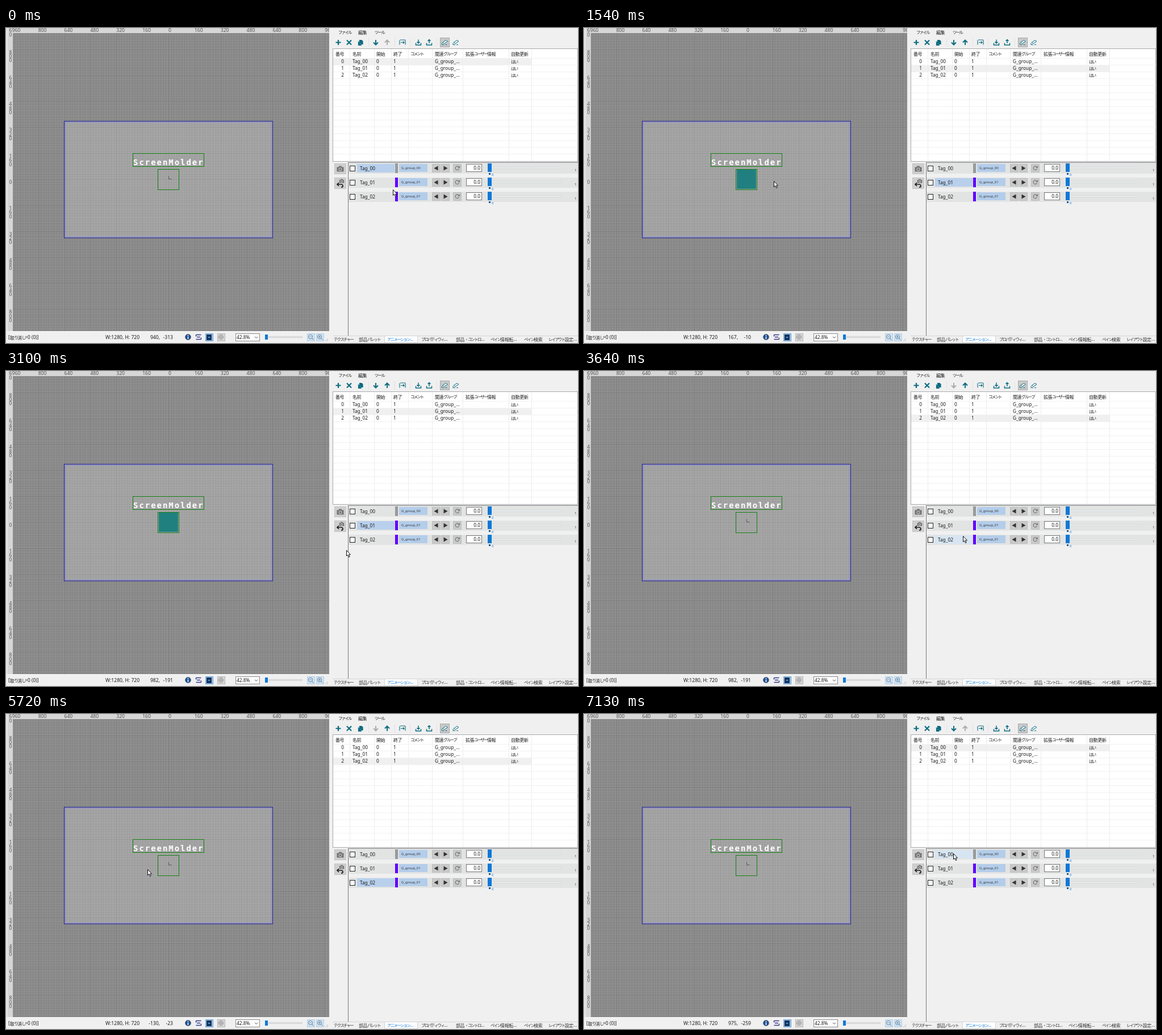
An HTML page with a canvas that plays this animation: 1007x556 px, repeating every 8 s.

```html
<!DOCTYPE html>
<html lang="ja">
<head>
<meta charset="utf-8">
<title>Layout tool</title>
<style>
html, body { margin: 0; width: 100%; height: 100%; overflow: hidden; background: #f0f0f0; }
canvas { display: block; }
</style>
</head>
<body>
<canvas id="stage" width="1007" height="556"></canvas>
<script>
const c = document.getElementById('stage').getContext('2d');
const LOOP = 8000, SCALE = 0.2867, CX = 286, CY = 267;
const TEAL = '#0b6b80', BLUE = '#0f78d7', INK = '#1c1c1c';

// Cursor moves: start, end, number of steps, points on the way
const moves = [
  [80, 310, 4, [[681, 285], [674, 277], [666, 272]]],
  [860, 1540, 10, [[666, 272], [560, 300], [420, 305], [334, 270]]],
  [1620, 2390, 11, [[334, 270], [300, 234], [240, 240], [232, 264], [233.8, 286.2]]],
  [2710, 3250, 8, [[233.8, 286.2], [400, 315], [567, 322], [667, 291]]],
  [3870, 4640, 11, [[667, 291], [500, 276], [340, 275], [240.4, 294.2]]],
  [4710, 5480, 11, [[240.4, 294.2], [300, 320], [341, 270], [290, 228], [240, 255], [252, 285]]],
  [5580, 5720, 3, [[252, 285], [248.7, 273.6]]],
  [6140, 6900, 11, [[248.7, 273.6], [400, 335], [565, 341], [650, 246]]]
];

function along(points, u) {
  const n = points.length - 1, k = Math.min(n - 1, Math.floor(u * n)), f = u * n - k;
  const [a, b, d, e] = [-1, 0, 1, 2].map(i => points[Math.max(0, Math.min(n, k + i))]);
  return [0, 1].map(i => b[i] + f / 2 * (d[i] - a[i] +
    f * (2 * a[i] - 5 * b[i] + 4 * d[i] - e[i] + f * (3 * (b[i] - d[i]) + e[i] - a[i]))));
}

function cursorAt(t) {
  const [from, to, steps, points] = moves.filter(m => t >= m[0]).pop() || moves[0];
  if (t < from) return points[0];
  const done = Math.floor((t - from) / (to - from) * (steps - 1) + 1e-6) + 1;
  return along(points, Math.min(1, done / steps));
}

function box(x, y, w, h, fill, edge) {
  if (fill) { c.fillStyle = fill; c.fillRect(x, y, w, h); }
  if (edge) { c.strokeStyle = edge; c.lineWidth = 1; c.strokeRect(x + .5, y + .5, w - 1, h - 1); }
}

function draw(x, y, path, stroke, fill, width = 1) {
  const p = new Path2D(path);
  c.save();
  c.translate(x, y);
  if (fill) { c.fillStyle = fill; c.fill(p); }
  if (stroke) { c.strokeStyle = stroke; c.lineWidth = width; c.stroke(p); }
  c.restore();
}

// Kana are set smaller and tighter than kanji, as in a compact UI face
function text(s, x, y, color = INK, size = 8.3, align = 'left') {
  c.fillStyle = color;
  c.textBaseline = 'middle';
  c.textAlign = align;
  for (const run of s.match(/[\u3040-\u30ff]+|[\u4e00-\u9fff]+|[^\u3040-\u9fff]+/g)) {
    const kana = /[\u3040-\u30ff]/.test(run), kanji = /[\u4e00-\u9fff]/.test(run);
    c.font = kana ? '7.3px "Noto Sans CJK JP", "Noto Sans CJK", sans-serif'
      : kanji ? '8px "Noto Sans CJK JP", "Noto Sans CJK", sans-serif'
      : size + 'px "Noto Sans", "Open Sans", sans-serif';
    c.letterSpacing = kana ? '-1.6px' : kanji ? '-0.4px' : '0px';
    c.fillText(run, x, y + .5);
    x += c.measureText(run).width;
  }
  c.letterSpacing = '0px';
}

function grid(step, color) {
  for (let x = CX - Math.floor(274 / step) * step; x < 569; x += step) box(Math.round(x), 9, 1, 526, color);
  for (let y = CY - Math.floor(258 / step) * step; y < 535; y += step) box(12, Math.round(y), 557, 1, color);
}

function canvasArea(logo) {
  box(0, 0, 570, 536, '#e4e4e4');
  box(3, 0, 567, 535, '#d6d6d6');
  box(12, 9, 558, 526, '#8e8e8e');
  grid(16 * SCALE, 'rgba(0,0,0,.05)');
  grid(160 * SCALE, 'rgba(0,0,0,.05)');
  box(102, 164, 368, 207, 'rgba(255,255,255,.2)', '#1c1c9c');
  box(104, 166, 364, 203, null, '#8585cf');

  c.save();
  c.beginPath();
  c.rect(3, 0, 566, 535);
  c.clip();
  for (let i = -6; i <= 6; i++) {
    const label = String(Math.abs(i * 160)), d = i * 160 * SCALE;
    text(label, CX + d, 4, '#555', 8.6);
    [...label].forEach((ch, k) => text(ch, 8, CY + d + 5 + k * 7.4, '#555', 8.6, 'center'));
  }
  c.restore();
  box(0, 535, 570, 1, '#f8f8f8');

  if (logo) box(269, 250, 34, 34, '#208080');
  else draw(286.5, 261.5, 'M0 0V5H5', '#555');
  box(223, 221, 126, 24, null, '#118011');
  box(267, 249, 38, 37, null, '#118011');
  c.font = 'bold 14px "DejaVu Sans Mono", monospace';
  c.letterSpacing = '1.95px';
  c.textAlign = 'left';
  c.textBaseline = 'alphabetic';
  c.fillStyle = '#fff';
  c.fillText('ScreenMolder', 224, 242);
  c.letterSpacing = '0px';
}

function statusBar(x, y) {
  box(0, 536, 570, 20, '#f0f0f0');
  text('[取り消し=0 (0)]', 4, 546);
  text('W:1280, H: 720', 175, 546, INK, 8.6);
  text(x + ',', 271, 546, INK, 8.6, 'right');
  text(String(y), 294, 546, INK, 8.6, 'right');
  draw(320.5, 545.5, 'M5 0A5 5 0 1 1 -5 0A5 5 0 1 1 5 0', '#777', '#1b4f94');
  draw(320.5, 545.5, 'M0 -3.4V-1.8M0 -.8V3.4', '#fff', null, 1.6);
  draw(339, 545.5, 'M-4.5 -4H4.5M-4.5 4H4.5M-3 0H3M-4.5 -4V-1M4.5 1V4', '#34348a', null, 1.4);
  box(351, 539, 14, 14, '#9fc6ea', '#6aa0d0');
  box(353, 541, 9, 10, '#12335e');
  draw(357.5, 546, 'M-2.5 0Q0 -2 2.5 0Q0 2 -2.5 0', null, '#6aa0d0');
  box(372, 539, 14, 14, '#d8d8d8', '#b4b4b4');
  draw(378.5, 545.5, 'M4 0A4 4 0 1 1 -4 0A4 4 0 1 1 4 0M-4 0H4M0 -4V4', '#909090');
  box(404, 539, 43, 14, '#fff', '#8a8a8a');
  text('42.8%', 406, 546);
  draw(440.5, 546, 'M-2.5 -1.2L0 1.2L2.5 -1.2', '#444');
  box(462, 544, 60, 3, '#e2e4e4', '#d2d4d4');
  box(456, 541, 5, 9, BLUE);
  [537, 553].forEach((mx, i) => {
    box(mx - 7, 539, 14, 14, '#cfe2f2', '#b8cfe2');
    draw(mx - 1, 545, 'M3.5 0A3.5 3.5 0 1 1 -3.5 0A3.5 3.5 0 1 1 3.5 0M2.5 2.5L5.5 5.5M-2 0H2' +
      (i ? 'M0 -2V2' : ''), '#4a7496', '#f4faff');
  });
  draw(562, 553, 'M0 0L5 -5M3 0L5 -2', '#bbb');
}

function toolbar(sel) {
  box(569, 0, 438, 556, '#f0f0f0');
  text('ファイル', 585, 7);
  text('編集', 620, 7);
  text('ツール', 649, 7);
  draw(585, 25.5, 'M-4.5 0H4.5M0 -4.5V4.5', TEAL, null, 2.2);
  draw(604, 25.5, 'M-4 -4L4 4M4 -4L-4 4', TEAL, null, 2.2);
  draw(624, 25.5, 'M-1.5 -4H2L4 -2V3H-1.5ZM-3.5 -2V5H2', TEAL, TEAL, 1.2);
  const off = '#ababab';
  draw(651, 25.5, 'M0 -4.5V4M-4 0L0 4L4 0', sel == 2 ? off : TEAL, null, 2);
  draw(671, 25.5, 'M0 4.5V-4M-4 0L0 -4L4 0', sel == 0 ? off : TEAL, null, 2);
  draw(698, 25.5, 'M-5 -4V4M5 -4V4M-3 0H3M1 -2L3 0L1 2M-4 -4.5H5', TEAL, null, 1.1);
  const tray = 'M-4.5 1V4.5H4.5V1M0 -5V1.5';
  draw(726, 25.5, tray + 'M-2.5 -1L0 1.5L2.5 -1', TEAL, null, 1.5);
  draw(745, 25.5, tray + 'M-2.5 -2.5L0 -5L2.5 -2.5', TEAL, null, 1.5);
  box(764, 17, 17, 17, '#c9c9c9', '#a8a8a8');
  const pen = 'M-4 0L2 -4L5 -2L-1 2ZM-5 1V4H-1M1 4H4';
  draw(772.5, 25.5, pen, TEAL, '#eef6f8');
  draw(792, 25.5, pen, TEAL, '#eef6f8');
  draw(638.5, 18, 'M0 0V15M46 0V15M73 0V15M120 0V15', '#e2e2e2');
}

function table(sel) {
  box(575, 36, 432, 200, '#fff', '#a8abb0');
  box(576, 53 + Math.round(sel * 12.1), 349, 12, '#f0f0f0');
  for (const x of [605, 648, 678, 708, 750, 804, 885, 925]) box(x, 37, 1, 198, '#ececec');
  for (let i = 0; i < 15; i++) box(576, Math.round(53 + i * 12.1), 431, 1, '#f1f1f1');
  const cols = [580, 610, 652, 682, 712, 755, 809, 889];
  ['番号', '名前', '開始', '終了', 'コメント', '関連グループ', '拡張ユーザー情報', '自動更新']
    .forEach((s, i) => text(s, cols[i], 45));
  for (let i = 0; i < 3; i++) {
    const y = 59 + i * 12.1;
    text(String(i), 595, y, INK, 8.3, 'right');
    text('Tag_0' + i, 610, y);
    text('0', 652, y);
    text('1', 682, y);
    text('G_group_...', 755, y);
    text('はい', 889, y);
  }
}

function button(x, y, path, stroke, fill) {
  box(x, y, 15, 15, '#c9c9c9', '#bdbdbd');
  draw(x + 7.5, y + 7.5, path, stroke, fill, 1.2);
}

function tagRow(i, sel, hover) {
  const y = 240 + 25 * i;
  box(603, y - 1, 404, 18, '#e2e4e3');
  box(605, y + 3, 10, 10, '#fff', '#222');
  if (i == hover || i == sel) box(618, y, 66, 15, i == hover ? '#d7e5f2' : '#b8d0ec');
  text('Tag_0' + i, 623, y + 8);
  box(685, y - 1, 5, 17, i ? '#6200ff' : '#9a9a9a');
  box(692, y, 50, 14, '#b3cdea');
  text('G_group_0' + Math.min(i, 1), 696, y + 7, '#333', 6);
  button(750, y, 'M3 -4V4L-4 0Z', null, '#333');
  button(766, y, 'M-3 -4V4L4 0Z', null, '#333');
  button(787, y, 'M3 1A3.3 3.3 0 1 1 3 -1.5M4 -4V-1H1', '#777');
  box(810, y, 28, 14, '#fff', '#777');
  text('0.0', 835, y + 7, INK, 8.3, 'right');
  box(848, y + 5, 130, 4, '#e7eaea', '#d9dcdc');
  box(848, y - 1, 7, 15, BLUE);
  box(850, y + 16, 3, 3, '#17578f');
  text('0', 855, y + 18.5, BLUE, 6);
  text('1', 1001, y + 11, '#333', 6);
}

function animationPanel(sel, hover) {
  box(602, 237, 405, 1, '#777');
  box(602, 237, 1, 307, '#777');
  box(578, 239, 21, 19, '#cfcfcf', '#c2c2c2');
  box(578, 264, 21, 20, '#cfcfcf', '#c2c2c2');
  const camera = 'M-6 -3H-3L-2 -5H2L3 -3H6V5H-6ZM2.5 1A2.5 2.5 0 1 0 -2.5 1A2.5 2.5 0 1 0 2.5 1';
  const lens = 'M2.5 1A2.5 2.5 0 1 0 -2.5 1A2.5 2.5 0 1 0 2.5 1';
  for (const [x, y, size] of [[588.5, 248.5, 1], [591, 270, .7]]) {
    c.save();
    c.translate(x, y);
    c.scale(size, size);
    draw(0, 0, camera, null, '#747474');
    draw(0, 0, lens, '#d8d8d8', '#747474');
    c.restore();
  }
  draw(587, 277, 'M-4 -1H3Q6 -1 6 2Q6 4 3 4M-1 -4L-4 -1L-1 2', INK, null, 1.7);
  for (let i = 0; i < 3; i++) tagRow(i, sel, hover);
}

function tabs() {
  box(575, 543, 432, 1, '#d4d4d4');
  box(666, 543, 59, 13, '#fff', '#d4d4d4');
  const labels = ['テクスチャー', '部品パレット', 'アニメーション...', 'プロパティウィ...',
    '部品・コントロ...', 'ペイン情報転...', 'ペイン検索', 'レイアウト設定...'];
  const xs = [577, 621, 671, 731, 792, 853, 912, 955];
  labels.forEach((s, i) => text(s, xs[i], 549, i == 2 ? BLUE : '#333'));
}

function frame(now) {
  const t = now % LOOP;
  const sel = t < 780 ? 0 : t < 3640 ? 1 : t < 7130 ? 2 : 0;
  const hover = t >= 610 && t < 860 ? 1 : t >= 3470 && t < 3870 ? 2 : t >= 6980 ? 0 : -1;
  const [x, y] = cursorAt(t);
  const last = t < 2710 ? [940, -313] : t < 6140 ? [982, -191] : [975, -259];
  const pos = x < 569 ? [Math.round((x - CX) / SCALE), Math.round((CY - y) / SCALE)] : last;
  c.clearRect(0, 0, 1007, 556);
  canvasArea(sel == 1);
  statusBar(...pos);
  toolbar(sel);
  table(sel);
  animationPanel(sel, hover);
  tabs();
  draw(Math.round(x) + .5, Math.round(y) + .5,
    'M0 0V10L2.2 8L4 12L5.6 11.3L4 7.5H7Z', '#111', '#fff');
  requestAnimationFrame(frame);
}

requestAnimationFrame(frame);
</script>
</body>
</html>
```
